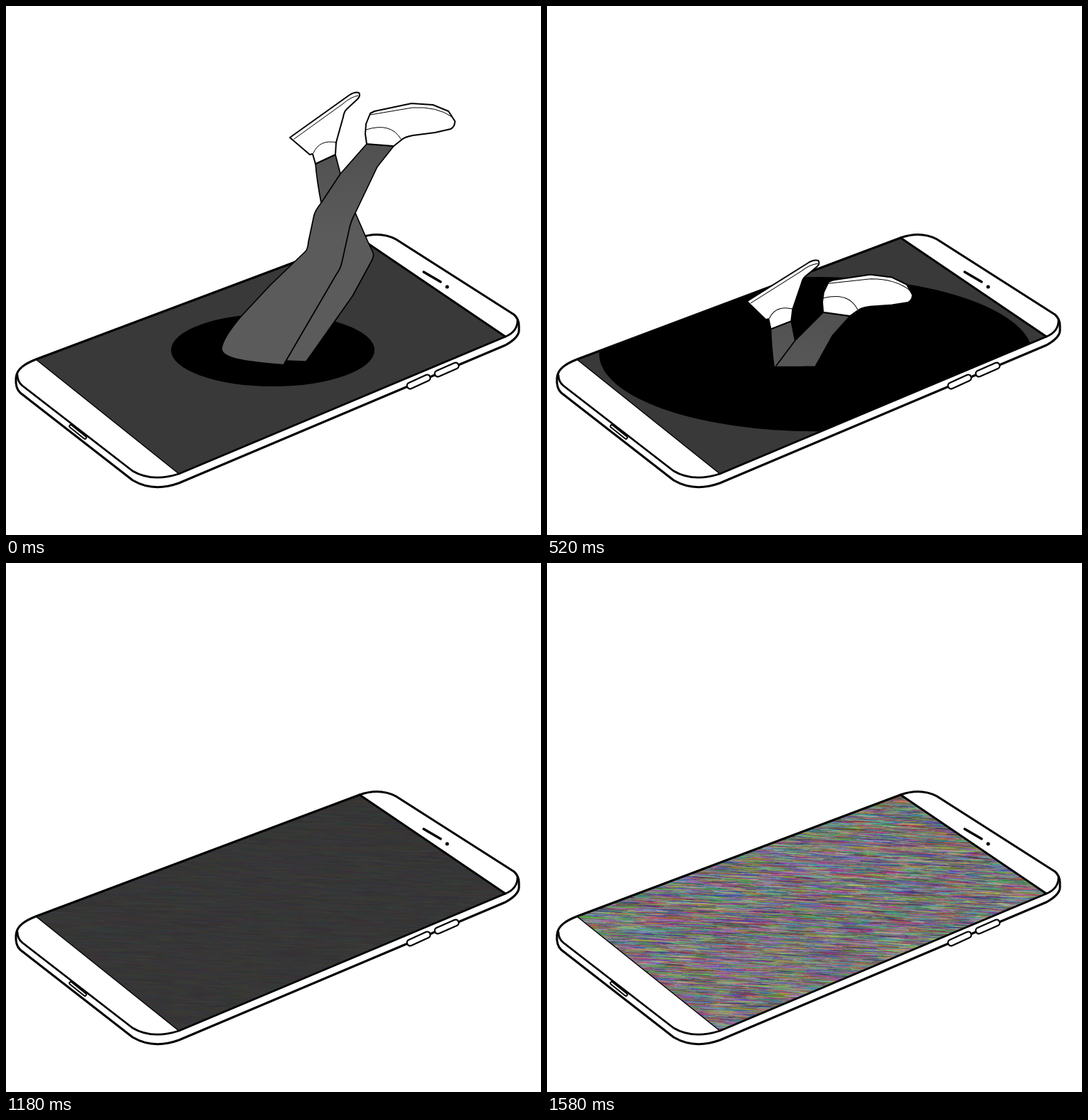
An HTML page with a canvas that plays this animation: 752x744 px, repeating every 1.68 s.

```html
<!DOCTYPE html>
<html lang="en">
<head>
<meta charset="utf-8">
<title>Swallowed by the phone</title>
<style>
  html, body { margin: 0; height: 100%; overflow: hidden; background: #fff; }
  canvas { display: block; }
</style>
</head>
<body>
<canvas id="stage" width="752" height="744"></canvas>
<script>
const W = 752, H = 744, LOOP = 1680;
const ctx = document.getElementById('stage').getContext('2d');
const path = d => new Path2D(d);

const phone = {
  body: path('M14 523C15 510 27 503 42 497L497 326Q525 316 548 328L714 434Q721 440 721 450V457Q720 467 702 477L243 671Q207 684 178 667L20 544Q13 538 14 523Z'),
  rim: path('M16 519Q16 528 23 534L178 654Q205 670 243 658L702 465Q719 458 719 442'),
  screen: path('M42 497L497 326L702 465L243 658Z'),
  topBar: path('M497 326L702 465'),
  bottomBar: path('M42 497L243 658')
};

const legs = {
  back: path('M435 222L463 209L470 236L491 291L508 330L516 347Q518 352 512 362L487 408L422 500L395 499L443 277Q437 246 435 222Z'),
  backEdge: path('M443 277Q437 246 435 222L463 209L470 236M491 291L508 330L516 347Q518 352 512 362L487 408L422 500L395 499'),
  front: path('M390 505C350 501 303 498 303 482Q304 468 330 437L372 392L420 346Q424 343 425 332L433 294Q435 287 443 277L470 236L507 194L545 197L522 226L491 291Q484 304 482 316L472 361Q470 370 464 378Z'),
  backShoe: path('M399 185L483 125Q491 120 496 122Q499 126 494 131L479 145Q475 149 474 156L464 192L463 209L435 222L431 208L427 209Z'),
  backSeams: path('M405 187L473 138Q484 128 495 126M432 207Q440 187 465 192'),
  frontShoe: path('M507 194L505 180L506 166L512 151L518 148L570 137L600 139L622 148L631 162Q631 170 625 173L603 178L572 182Q560 184 555 189L545 197Z'),
  frontSeams: path('M512 153L571 143Q606 141 627 156M506 174Q541 163 555 187')
};

const trousers = ctx.createLinearGradient(0, 190, 0, 320);
trousers.addColorStop(0, '#505050');
trousers.addColorStop(1, '#5b5b5b');

// Moments at which the legs sink one step further
const sinkTimes = [200, 250, 300, 360, 410, 470, 510, 560, 600, 640];
const STATIC_AT = 680;

function makeNoise() {
  const canvas = document.createElement('canvas');
  canvas.width = W;
  canvas.height = H;
  const c = canvas.getContext('2d');
  let seed = 7;
  const rand = n => (seed = (seed * 16807) % 2147483647) / 2147483647 * n;
  c.fillStyle = '#797679';
  c.fillRect(0, 0, W, H);
  for (let i = 0; i < 45000; i++) {
    const x = rand(710), y = 322 + rand(340), len = 16 + rand(26);
    c.strokeStyle = `rgba(${rand(242)},${rand(236)},${rand(242)},.42)`;
    c.beginPath();
    c.moveTo(x, y);
    c.lineTo(x + len, y + len * 0.05);
    c.stroke();
  }
  return canvas;
}
const noise = makeNoise();

function stroke(shape, width = 1.7) {
  ctx.lineWidth = width;
  ctx.strokeStyle = '#000';
  ctx.stroke(shape);
}

function shape(p, fill, width) {
  ctx.fillStyle = fill;
  ctx.fill(p);
  if (width) stroke(p, width);
}

function pill(d, outer, inner) {
  const p = path(d);
  stroke(p, outer);
  ctx.strokeStyle = '#fff';
  ctx.lineWidth = inner;
  ctx.stroke(p);
}

function noiseLevel(t) {
  return t < 1180 ? 1 : t < 1280 ? 0.1 : t < 1380 ? 0.3 : t < 1580 ? 0.5 : 1;
}

function drawScreen(t, step) {
  ctx.save();
  ctx.clip(phone.screen);
  ctx.fillStyle = t < STATIC_AT ? '#393939' : '#2f2f2f';
  ctx.fillRect(0, 0, W, H);
  if (t < STATIC_AT) {
    const rx = 143 + 0.319 * step ** 3.2;
    ctx.fillStyle = '#000';
    ctx.beginPath();
    ctx.ellipse(375 + 0.4 * step, 484 + 0.8 * step, rx, rx * 0.357, 0, 0, 7);
    ctx.fill();
  } else {
    ctx.globalAlpha = noiseLevel(t);
    ctx.drawImage(noise, 0, 0);
  }
  ctx.restore();
}

function drawPhone(t, step) {
  shape(phone.body, '#fff');
  drawScreen(t, step);
  stroke(phone.body, 3);
  stroke(phone.rim, 2.8);
  stroke(phone.topBar, 2.8);
  stroke(phone.bottomBar, 1.4);
  stroke(path('M587 374L611 388'), 3.4);
  stroke(path('M620 395h.1'), 5);
  pill('M568 534L592 523', 11, 6.5);
  pill('M607 517L632 506', 11, 6.5);
  pill('M91 591L111 607', 5.6, 1.8);
}

function drawLegs(step) {
  const dx = -20 * step + 0.52 * step * step;
  const dy = 25.5 * step + 1.18 * step * step;
  ctx.save();
  ctx.beginPath();
  ctx.rect(0, 0, W, 506.5);
  ctx.clip();
  // The feet tip over slightly once the knees are gone
  ctx.translate(497 + dx, 122 + dy);
  ctx.rotate(Math.max(0, step - 5) * 0.03);
  ctx.translate(-497, -122);
  shape(legs.back, trousers);
  stroke(legs.backEdge);
  shape(legs.backShoe, '#fff', 2);
  stroke(legs.backSeams, 1);
  shape(legs.front, trousers, 1.7);
  shape(legs.frontShoe, '#fff', 2);
  stroke(legs.frontSeams, 1);
  ctx.restore();
}

function draw(now) {
  const t = now % LOOP;
  const step = sinkTimes.filter(s => s <= t).length;
  ctx.fillStyle = '#fff';
  ctx.fillRect(0, 0, W, H);
  ctx.lineCap = ctx.lineJoin = 'round';
  drawPhone(t, step);
  if (t < STATIC_AT) drawLegs(step);
}

let start;
function tick(now) {
  start ??= now;
  draw(now - start);
  requestAnimationFrame(tick);
}
requestAnimationFrame(tick);
</script>
</body>
</html>
```
